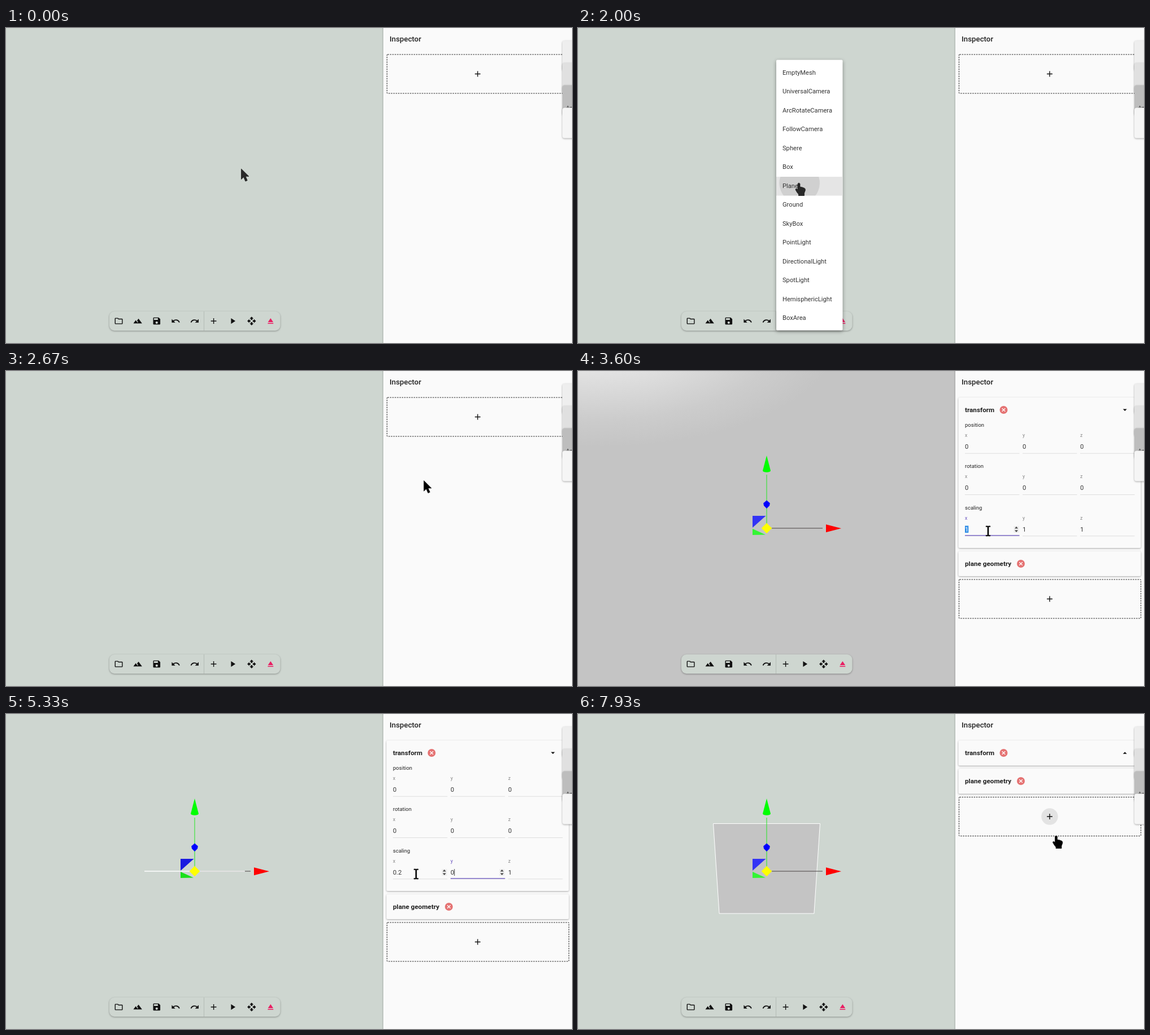
Recreate the animation shown at these times as an HTML page. Size 1002x559 px, loop 8 s.

```html
<!DOCTYPE html>
<html lang="en">
<head>
<meta charset="utf-8">
<title>Scene editor</title>
<style>
  html, body { margin: 0; width: 100%; height: 100%; overflow: hidden; background: #ced6d0; }
  svg { display: block; width: 100vw; height: 100vh; font-family: Roboto, "Open Sans", sans-serif; }
  .raised { filter: drop-shadow(0 1px 1.5px #0005); }
  .menu { filter: drop-shadow(0 2px 3px #0006); }
</style>
</head>
<body>
<svg viewBox="0 0 1002 559">
  <defs>
    <radialGradient id="shine" gradientUnits="userSpaceOnUse" r="1" cx="0" cy="0"
      gradientTransform="translate(40 -60) scale(420 195)">
      <stop offset="0" stop-color="#f2f2f2"/><stop offset=".35" stop-color="#e0e0e0"/>
      <stop offset=".75" stop-color="#cccccc"/><stop offset="1" stop-color="#c4c4c4"/>
    </radialGradient>
    <clipPath id="stage"><rect width="668" height="559"/></clipPath>
  </defs>
  <g id="view"></g>
</svg>
<script>
const LOOP = 8000;
const DARK = '#212121', ACCENT = '#654fbe', BACK = '#ced6d0', PANEL = '#fafafa';
const view = document.getElementById('view');

const clamp = v => Math.max(0, Math.min(1, v));
const progress = (t, start, length) => clamp((t - start) / length);
const smooth = p => p * p * (3 - 2 * p);
const between = (t, a, b) => t >= a && t < b;
// Last value of [[time, value], ...] that has been reached.
const latest = (steps, t) => steps.filter(s => s[0] <= t).pop()[1];

const rect = (x, y, w, h, fill, more = '') =>
  `<rect x="${x}" y="${y}" width="${w}" height="${h}" fill="${fill}" ${more}/>`;
const path = (d, fill, more = '') => `<path d="${d}" fill="${fill}" ${more}/>`;
const line = (d, color, width = 1) => path(d, 'none', `stroke="${color}" stroke-width="${width}"`);
const text = (x, y, s, size, fill = DARK, weight = 400) =>
  `<text x="${x}" y="${y}" font-size="${size}" fill="${fill}" font-weight="${weight}">${s}</text>`;
const icon = (x, y, d, fill = '#111') =>
  `<g transform="translate(${x} ${y}) scale(.7) translate(-12 -12)">${path(d, fill, 'fill-rule="evenodd"')}</g>`;

const PLUS = 'M19 13h-6v6h-2v-6H5v-2h6V5h2v6h6z';
const ICONS = [
  'M9.2 6l2 2H20v10H4V6zM10 4H4a2 2 0 0 0-2 2v12a2 2 0 0 0 2 2h16a2 2 0 0 0 2-2V8a2 2 0 0 0-2-2h-8z',
  'M14 6l-3.75 5 2.85 3.8-1.6 1.2L7 10l-6 8h22z',
  'M17 3H5a2 2 0 0 0-2 2v14a2 2 0 0 0 2 2h14a2 2 0 0 0 2-2V7zM12 19a3 3 0 1 1 0-6 3 3 0 0 1 0 6zM15 9H5V5h10z',
  'M12.5 8c-2.65 0-5.05 1-6.9 2.6L2 7v9h9l-3.6-3.6a8 8 0 0 1 12.7 3.6l2.4-.8A10.5 10.5 0 0 0 12.5 8z',
  'M11.5 8c2.65 0 5.05 1 6.9 2.6L22 7v9h-9l3.6-3.6a8 8 0 0 0-12.7 3.6l-2.4-.8A10.5 10.5 0 0 1 11.5 8z',
  PLUS,
  'M8 5v14l11-7z',
  'M10 9h4V6h3l-5-5-5 5h3zM9 10H6V7l-5 5 5 5v-3h3zM23 12l-5-5v3h-3v4h3v3zM14 15h-4v3H7l5 5 5-5h-3z',
  'M5 17h14v2H5zM12 5L5.3 15h13.4z'
];
const MENU = ['EmptyMesh', 'UniversalCamera', 'ArcRotateCamera', 'FollowCamera', 'Sphere', 'Box', 'Plane',
  'Ground', 'SkyBox', 'PointLight', 'DirectionalLight', 'SpotLight', 'HemisphericLight', 'BoxArea'];

const ADDED = 2720, FOCUS_X = 3200, FOCUS_Y = 5065, COLLAPSED = 7130;
const X_VALUES = [[0, '1'], [4325, '0'], [4525, '0.'], [4725, '0.2']];
const Y_VALUES = [[0, '1'], [5325, '0'], [5525, '0.'], [5665, '0.2']];

const TRACK = [[70, 416.5, 250], [400, 373, 511], [700, 373, 511], [1800, 391, 275], [2070, 391, 275],
  [2270, 740, 176], [2600, 740.5, 190], [3130, 726, 284], [6200, 726, 284], [7000, 959, 65],
  [7200, 959, 65], [7870, 841, 190], [7930, 846.5, 216]];
const POINTERS = [[0, 'arrow'], [340, 'hand'], [2110, 'arrow'], [2960, 'beam'], [6330, 'arrow'],
  [6900, 'hand'], [7330, 'arrow'], [7670, 'hand']];
const POINTER_PATHS = {
  arrow: 'M0 0V18.6L4.2 14.6 7.4 22 10.7 20.5 7.6 13.3H13.4z',
  hand: 'M-2 1.6Q0-1.6 2 1.6V7l3 .4 3 1 2.2 1Q11.6 10 11.4 13L9.5 18V22.5H-.5V20L-3 17-6 12Q-6 9.5-3.5 10.4L-2 12z',
  beam: 'M-3.8-9H-1L0-8.4 1-9H3.8V-7.4H1V7.4H3.8V9H1L0 8.4-1 9H-3.8V7.4H-1V-7.4H-3.8z'
};

function pointerAt(t) {
  const next = TRACK.findIndex(k => k[0] > t);
  if (next === 0) return TRACK[0].slice(1);
  if (next < 0) return TRACK[TRACK.length - 1].slice(1);
  const [t0, x0, y0] = TRACK[next - 1], [t1, x1, y1] = TRACK[next];
  const p = smooth((t - t0) / (t1 - t0));
  return [x0 + (x1 - x0) * p, y0 + (y1 - y0) * p];
}

function pointer(t) {
  const [x, y] = pointerAt(t);
  const fill = t < 2110 ? '#292929' : '#000';
  return `<g transform="translate(${x} ${y})">${path(POINTER_PATHS[latest(POINTERS, t)], fill, 'stroke="#000" stroke-width=".6"')}</g>`;
}

// The plane leans away from the camera, so its upper edge is nearer.
function planePath(sx, sy) {
  const corner = (u, v) => {
    const depth = 1 - .2965 * v * sy;
    return `${334 + u * 444.5 * sx / depth} ${279 - v * 397.5 * sy / depth}`;
  };
  return `M${corner(-1, 1)}L${corner(1, 1)}L${corner(1, -1)}L${corner(-1, -1)}z`;
}

function scene(t) {
  if (t < ADDED) return '';
  const sx = +latest(X_VALUES, t), sy = +latest(Y_VALUES, t);
  const flat = !sx || !sy;
  const plane = path(planePath(sx, sy), 'url(#shine)', 'stroke="#fff"');
  const axes = line('M334 184V272', '#22e622') + line('M343 279H433', '#484040');
  return `<g clip-path="url(#stage)">` + (flat ? axes + plane : plane + axes) +
    path('M309 257H332.5L309 278z', flat ? '#1a1ae0' : '#3333f5') +
    path('M309 280L332 290.5 309 291z', flat ? '#1ae01a' : '#33f533') +
    path('M334 150L341 177Q340 179.8 334 179.8T327 177z', '#0f0') +
    path('M466 279.3L439 272.3V286.3z', '#f00') +
    path('M334 229.5L339.8 234.5 339 239 334 244 329 239 328.2 234.5z', '#00f') +
    path('M334 269.8L343.3 279 334 288.2 324.7 279z', '#ff0') +
    (sx ? '' : line('M334 150V181M334 229V244', '#fff9')) + '</g>';
}

function toolbar() {
  return rect(183, 503, 302.5, 34, BACK, 'rx="9" class="raised"') + line('M350.5 503V537', '#b4bcb6') +
    ICONS.map((d, i) => icon(199.6 + 33.6 * i, 520, d, i === 8 ? '#e91e63' : '#111')).join('');
}

function menu(t) {
  const closing = progress(t, 2090, 75);
  if (t < 600 || closing === 1) return '';
  const opening = smooth(progress(t, 590, 120));
  const hovered = t > 710 ? Math.floor((pointerAt(t)[1] + 2 - 62.2) / 33.5) : -1;
  const press = smooth(progress(t, 1975, 225));
  const items = MENU.map((name, i) => {
    const y = 62.2 + 33.5 * i;
    const area = fill => rect(351, y + .8, 117.5, 33.5, fill);
    const ripple = i === 6 && t >= 1975 ? `<clipPath id="item">${area('#000')}</clipPath>
      <circle cx="${391.5 + 18 * press}" cy="${275 + 5 * press}" r="${34.5 + 35 * press}"
        fill="#000" fill-opacity=".09" clip-path="url(#item)"/>` : '';
    return (i === hovered ? area('#e5e5e5') : '') + ripple + text(362, y + 20.5, name, 11.17, '#333');
  }).join('');
  const scale = .8 + .2 * opening;
  return `<g opacity="${opening * (1 - closing)}" transform="translate(351 537) scale(${scale}) translate(-351 -537)">` +
    rect(351, 56.5, 117.5, 480, '#fff', 'rx="2" class="menu"') + items + '</g>';
}

const card = (y, h, title, crossX) =>
  rect(673.5, y, 323, h, PANEL, 'rx="2.5" class="raised"') + text(685, y + 26, title, 11.73, DARK, 700) +
  `<circle cx="${crossX}" cy="${y + 22}" r="7" fill="#e57373"/>` +
  line(`M${crossX - 2.8} ${y + 19.2}l5.6 5.6m0-5.6l-5.6 5.6`, '#fff', 1.3);

function addBox(y, halo = 0) {
  return rect(674.5, y + .5, 322, 69, 'none', 'stroke="#222" stroke-dasharray="2.5 1.7" rx="1"') +
    `<circle cx="835" cy="${y + 35}" r="14.7" fill="#000" fill-opacity="${.09 * halo}"/>` + icon(835, y + 35, PLUS);
}

// state: focus start time, last edit time, selected, spinner
function field(t, x, y, label, value, state = {}) {
  const active = state.focus !== undefined;
  let out = text(x, y + 3, label, 8.6, active ? ACCENT : '#858585');
  const width = value.length * 6.2 - (value.includes('.') ? 3.2 : 0);
  if (state.selected) out += rect(x, y + 14, 6.3, 12.5, '#338fe6');
  out += text(x, y + 24, value, 11.17, state.selected ? '#fff' : '#333');
  if (active && !state.selected && Math.floor((t - state.edit) / 530) % 2 === 0)
    out += rect(x + width + .2, y + 14.5, .9, 12, '#222');
  out += line(`M${x} ${y + 32.2}h96.5`, '#dedede');
  if (active) {
    const grown = smooth(progress(t, state.focus, 180)) * 48.25;
    out += line(`M${x + 48.25 - grown} ${y + 31.3}h${grown * 2}`, ACCENT, 1.4);
  }
  if (state.spinner) out += rect(x + 86.5, y + 14.5, 9, 12, '#eee') +
    path(`M${x + 88} ${y + 19}l3-3.5 3 3.5zm0 3h6l-3 3.5z`, '#444');
  return out;
}

function transformFields(t) {
  const focusX = between(t, FOCUS_X, FOCUS_Y), focusY = t >= FOCUS_Y;
  const stateX = { spinner: between(t, 2960, 6270) };
  const stateY = { spinner: focusY };
  // The caret stays lit while typing goes on.
  if (focusX) Object.assign(stateX, { focus: FOCUS_X, selected: t < 4325, edit: Math.min(t, 4725) });
  if (focusY) Object.assign(stateY, { focus: FOCUS_Y, selected: t < 5325, edit: Math.min(t, 5665) });
  return ['position', 'rotation', 'scaling'].map((group, row) => {
    const y = 114 + 73.3 * row, scaling = row === 2, rest = scaling ? '1' : '0';
    return text(685, y - 15, group, 9.5, '#222') +
      field(t, 685, y, 'x', scaling ? latest(X_VALUES, t) : rest, scaling ? stateX : {}) +
      field(t, 787, y, 'y', scaling ? latest(Y_VALUES, t) : rest, scaling ? stateY : {}) +
      field(t, 889, y, 'z', rest);
  }).join('');
}

function sideTabs() {
  const tab = (y, h, fill) => rect(985, y, 40, h, fill, 'rx="4" class="raised"');
  return tab(22.5, 53, '#eeeeee') + tab(62, 53, '#e0e0e0') + tab(101.5, 53, '#bdbdbd') +
    text(991.5, 144.5, 'An', 9.5, '#333') + tab(141.5, 54, '#f5f5f5');
}

function inspector(t) {
  let out = rect(668, -4, 340, 570, PANEL, 'class="raised"') + text(679, 24.3, 'Inspector', 13.3, DARK, 500);
  if (t < ADDED) out += addBox(46.5);
  else if (t < COLLAPSED) out += card(47, 267, 'transform', 753.5) + path('M964.7 67.5h7l-3.5 3.5z', '#111') +
    transformFields(t) + card(320, 44, 'plane geometry', 784) + addBox(369.5);
  else out += card(47, 44.5, 'transform', 753.5) + path('M964.7 70.7h7l-3.5-3.5z', '#111') +
    card(97, 44.5, 'plane geometry', 784) + addBox(147, progress(t, 7760, 100));
  return out + sideTabs();
}

let shown = '';
function frame(now) {
  const t = now % LOOP;
  const next = scene(t) + toolbar() + inspector(t) + menu(t) + pointer(t);
  if (next !== shown) view.innerHTML = shown = next;
  requestAnimationFrame(frame);
}
frame(0);
</script>
</body>
</html>
```
